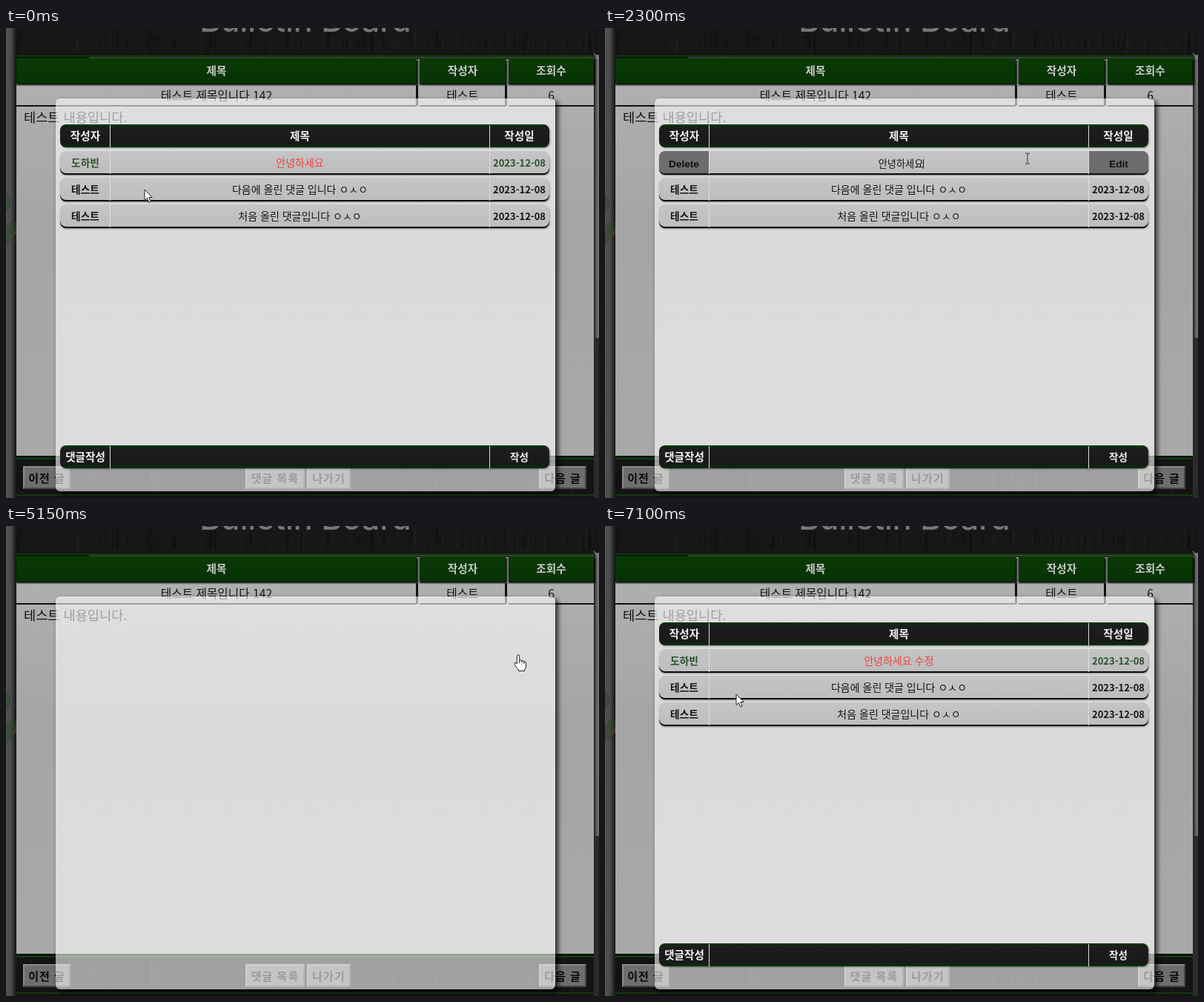
An HTML page that plays this animation: 800 px wide and 634 px high, repeating every 7.15 s.

```html
<!DOCTYPE html>
<html lang="ko">
<head>
<meta charset="utf-8">
<style>
  html, body { margin: 0; width: 100%; height: 100%; overflow: hidden; background: #111; }
  svg { display: block; width: 800px; height: 634px; }
  text { font-family: 'Noto Sans CJK KR', 'Noto Sans CJK', 'Noto Sans', sans-serif; white-space: pre; }
</style>
</head>
<body>
<svg id="stage" viewBox="0 0 800 634">
  <defs>
    <linearGradient id="leftEdge"><stop stop-color="#535553"/><stop offset=".5" stop-color="#484948"/><stop offset="1" stop-color="#141414"/></linearGradient>
    <linearGradient id="rightEdge"><stop stop-color="#1c1c1c"/><stop offset=".6" stop-color="#666"/><stop offset="1" stop-color="#777"/></linearGradient>
    <linearGradient id="paper" x2="0" y2="1"><stop stop-color="#b0b1b3"/><stop offset=".4" stop-color="#a6a5a6"/><stop offset="1" stop-color="#a9a8a9"/></linearGradient>
    <linearGradient id="green" x2="0" y2="1"><stop stop-color="#0a3a05"/><stop offset="1" stop-color="#063203"/></linearGradient>
    <linearGradient id="bar" x2="0" y2="1"><stop stop-color="#0b3a08"/><stop offset=".09" stop-color="#0d2a0b"/><stop offset=".13" stop-color="#1d1d1e"/><stop offset=".87" stop-color="#191919"/><stop offset=".92" stop-color="#0c280a"/><stop offset="1" stop-color="#083006"/></linearGradient>
    <linearGradient id="row" x2="0" y2="1"><stop stop-color="#c5c4c6"/><stop offset="1" stop-color="#bdbcbe"/></linearGradient>
    <filter id="blur" x="-10%" y="-10%" width="120%" height="120%"><feGaussianBlur stdDeviation="3"/></filter>
    <filter id="soft" x="-10%" y="-40%" width="120%" height="200%"><feGaussianBlur stdDeviation="1"/></filter>
    <mask id="outside"><rect width="800" height="634" fill="#fff"/><rect x="67" y="95" width="674" height="530" rx="6" fill="#000"/></mask>
    <clipPath id="rowClip"><rect x="73" y="166" width="660" height="30" rx="8"/></clipPath>
  </defs>
  <g id="page"></g>
  <rect x="70" y="98" width="675" height="531" rx="6" opacity=".75" filter="url(#blur)" mask="url(#outside)"/>
  <rect x="67" y="95" width="674" height="530" rx="6" fill="#fff" opacity=".6"/>
  <g id="list">
    <g id="rows"></g>
    <g id="view"></g>
    <g id="edit">
      <g clip-path="url(#rowClip)" fill="#6d6c6e"><rect x="73" y="166" width="67" height="31"/><rect x="653" y="166" width="81" height="31"/></g>
      <path id="caret" stroke="#111"/>
    </g>
    <path d="M140.500 131V161M652.500 131V161M140.500 166V197M652.500 166V197M140.500 202V233M652.500 202V233M140.500 238V269M652.500 238V269M140.500 564V594M652.500 564V594" stroke="#dededf"/>
  </g>
  <g id="pointer">
    <path id="arrow" d="M0 0V14.500L3.400 11.300L5.800 17L8.200 16L5.800 10.500H10.300Z" fill="#fff" stroke="#222"/>
    <g id="hand" fill="#fff" stroke="#222">
      <path d="M-1.700 12V1.500Q-1.700 0 0 0Q1.700 0 1.700 1.500V7.500Q4.500 6 5 8Q7.500 7 8 9Q10.500 8.500 10.500 11V15Q10.500 18 8.500 20V21.500H.500V20Q-2 18 -4.500 13.500Q-6 10.500 -4 10.200Q-2.800 10.300 -1.700 12Z"/>
      <path d="M1.700 7.500V11M5 8V11M8 9V12" fill="none"/>
    </g>
    <path id="beam" d="M-3 -7H-.800L0 -6.300L.800 -7H3M0 -6.300V6.300M-3 7H-.800L0 6.300L.800 7H3" fill="none" stroke="#333"/>
  </g>
</svg>
<script>
const $ = id => document.getElementById(id);
const LOOP = 7150, EDIT_START = 1650, EDIT_END = 5100, LIST_BACK = 5300;

function add(parent, tag, attrs, content) {
  const el = document.createElementNS('http://www.w3.org/2000/svg', tag);
  for (const key in attrs) el.setAttribute(key, attrs[key]);
  if (content) el.textContent = content;
  return $(parent).appendChild(el);
}
const rect = (parent, x, y, width, height, fill, more) => add(parent, 'rect', { x, y, width, height, fill, ...more });
// y is the visual middle of the line
const label = (parent, x, y, size, content, more) => add(parent, 'text',
  { x, y: y + size * 0.37, 'font-size': size, 'text-anchor': 'middle', ...more }, content);

let seed = 7;
const random = () => (seed = seed * 16807 % 2147483647) / 2147483647;

function wood(y, height, count) {
  for (let i = 0; i < count; i++) {
    const top = random() * height * 0.5;
    rect('page', 14 + random() * 778, y + top, 1 + random() * 2, (height - top) * (0.5 + random() / 2),
      random() < 0.6 ? '#000' : '#303030', { opacity: 0.2 });
  }
}

function drawPage() {
  rect('page', 0, 0, 800, 634, '#151515');
  rect('page', 0, 0, 14, 634, 'url(#leftEdge)');
  add('page', 'path', { d: 'M0 222Q8 228 6 240L0 250ZM0 268Q8 258 14 262V272Q8 286 0 294Z', fill: '#264525', opacity: 0.4 });
  add('page', 'path', { d: 'M8 282L14 270V278Z', fill: '#75452f', opacity: 0.5 });
  rect('page', 793, 36, 7, 384, 'url(#rightEdge)');
  rect('page', 793, 418, 7, 216, '#2b2b2b');
  add('page', 'path', { d: 'M793 34L800 42', stroke: '#aaa' });

  rect('page', 14, 0, 779, 36, '#171717');
  wood(0, 36, 130);
  label('page', 404, -11, 43, 'Bulletin Board', { fill: '#777', 'font-weight': 500, style: 'font-family:Inter,sans-serif' });
  rect('page', 14, 35, 779, 6, '#0c1c0b');
  rect('page', 14, 37, 779, 1.5, '#173a14');
  rect('page', 112, 39, 681, 2, '#555', { opacity: 0.6 });

  rect('page', 14, 42, 779, 535, 'url(#paper)');
  for (const [x, width, title, value] of [[14, 540, '제목', '테스트 제목입니다 142'], [558, 116, '작성자', '테스트'], [678, 115, '조회수', '6']]) {
    const middle = x + width / 2;
    rect('page', x, 43, width + 2, 34, '#000', { filter: 'url(#soft)' });
    rect('page', x, 41, width, 34, 'url(#green)');
    label('page', middle, 58, 14.6, title, { fill: '#c9cbc8', 'font-weight': 700 });
    rect('page', x, 104, width, 2, '#111');
    if (x + width < 790) rect('page', x + width - 1, 77, 3, 28, '#111');
    label('page', middle, 91, 15.7, value, { fill: '#161616' });
  }
  label('page', 24, 120, 17.6, '테스트 내용입니다.', { fill: '#111', 'text-anchor': 'start' });

  rect('page', 14, 577, 779, 57, '#151415');
  wood(584, 46, 110);
  rect('page', 14, 577, 779, 6, '#0b160a');
  rect('page', 14, 580, 779, 2, '#144012');
  rect('page', 14, 629, 779, 2, '#123a10');
  for (const [x, width, title] of [[23, 64, '이전 글'], [323, 80, '댓글 목록'], [406, 59, '나가기'], [719, 64, '다음 글']]) {
    rect('page', x, 591, width, 31, '#6e6e6e');
    add('page', 'path', { d: `M${x + 1} 621V592H${x + width - 1}`, fill: 'none', stroke: '#8b8b8b', 'stroke-width': 2 });
    add('page', 'path', { d: `M${x + 1} 621H${x + width - 1}V592`, fill: 'none', stroke: '#484848', 'stroke-width': 2 });
    label('page', x + width / 2, 607, 15, title, { fill: '#080808', 'font-weight': 700, 'letter-spacing': 1 });
  }
}

function drawBar(y, left, middle, right) {
  rect('rows', 74, y + 2, 660, 30, '#000', { rx: 8, opacity: 0.4, filter: 'url(#soft)' });
  rect('rows', 73, y, 660, 31, 'url(#bar)', { rx: 8 });
  const bold = { fill: '#f2f2f2', 'font-weight': 700 };
  label('rows', 107, y + 16, 14.6, left, bold);
  label('rows', 396.5, y + 16, 14.6, middle, bold);
  label('rows', 692.5, y + 16, right === '작성' ? 13.5 : 14.6, right, bold);
}

function drawRow(y, name, title) {
  rect('rows', 73.500, y + 3, 660, 30, '#000', { rx: 8, opacity: 0.4, filter: 'url(#soft)' });
  rect('rows', 73, y + 2, 660, 30, '#0b0b0b', { rx: 8 });
  rect('rows', 73, y, 660, 30, 'url(#row)', { rx: 8 });
  if (name) rowText('rows', y, name, title, '#161616', '#161616');
}

function rowText(parent, y, name, title, color, titleColor) {
  label(parent, 107, y + 16, 13.7, name, { fill: color, 'font-weight': 700 });
  label(parent, 692.5, y + 16, 13, '2023-12-08', { fill: color, 'font-weight': 700 });
  return label(parent, 396.5, y + 16, 14, title, { fill: titleColor });
}

drawPage();
drawBar(130, '작성자', '제목', '작성일');
drawRow(166);
drawRow(202, '테스트', '다음에 올린 댓글 입니다 ㅇㅅㅇ');
drawRow(238, '테스트', '처음 올린 댓글입니다 ㅇㅅㅇ');
drawBar(563, '댓글작성', '', '작성');

const GREETING = '안녕하세요';
const viewTitle = rowText('view', 166, '도하빈', GREETING, '#2b532a', '#ee463b');
const buttonStyle = { fill: '#101010', 'font-weight': 700, style: "font-family:'Liberation Sans',Arial,sans-serif" };
label('edit', 106.5, 182.5, 13.6, 'Delete', buttonStyle);
label('edit', 693, 182.5, 13.6, 'Edit', buttonStyle);
const input = label('edit', 399, 183, 13.2, '', { id: 'input', fill: '#151515' });
const typed = add('input', 'tspan');
const composing = add('input', 'tspan', { 'text-decoration': 'underline' });

const keystrokes = [[3550, ''], [3650, 'ㅅ'], [3750, '수'], [3950, '숮'], [4050, '수저'], [4150, '수정']];
const path = [
  [0, 187, 218], [50, 187, 218], [750, 250, 192], [1250, 342, 172], [1500, 515, 175], [1800, 515, 176],
  [2250, 570, 176], [4400, 570, 176], [4600, 597, 120], [5000, 691, 174], [5200, 691, 174],
  [5650, 439, 185], [5900, 439, 185], [6550, 734, 434], [6650, 734, 434], [7100, 177, 227], [LOOP, 177, 227]
];

function pointerAt(t) {
  const i = path.findIndex(point => point[0] > t);
  const [t0, x0, y0] = path[i - 1], [t1, x1, y1] = path[i];
  const p = (t - t0) / (t1 - t0), k = p * p * (3 - 2 * p);
  return [x0 + (x1 - x0) * k, y0 + (y1 - y0) * k];
}

const show = (id, on) => $(id).setAttribute('visibility', on ? 'inherit' : 'hidden');

function render(t) {
  const editing = t >= EDIT_START && t < EDIT_END;
  show('list', t < EDIT_END || t >= LIST_BACK);
  show('view', !editing);
  show('edit', editing);
  viewTitle.textContent = t < EDIT_END ? GREETING : GREETING + ' 수정';

  const stroke = keystrokes.filter(key => key[0] <= t).pop();
  typed.textContent = stroke ? GREETING + ' ' : GREETING;
  composing.textContent = stroke ? stroke[1] : '';
  const caretX = Math.round(399 + input.getComputedTextLength() / 2) + 0.5;
  $('caret').setAttribute('d', `M${caretX} 177V190`);
  show('caret', editing && (stroke || (t - 1240) % 1060 < 530));

  const [x, y] = pointerAt(t);
  const overRow = y >= 166 && y < 198 && x > 73 && x < 733;
  const beam = overRow && editing && x > 140 && x < 653;
  $('pointer').setAttribute('transform', `translate(${Math.round(x)} ${Math.round(y)})`);
  show('arrow', !overRow);
  show('beam', beam);
  show('hand', overRow && !beam);
}

const start = performance.now();
function tick() {
  render((performance.now() - start) % LOOP);
  requestAnimationFrame(tick);
}
tick();
</script>
</body>
</html>
```
